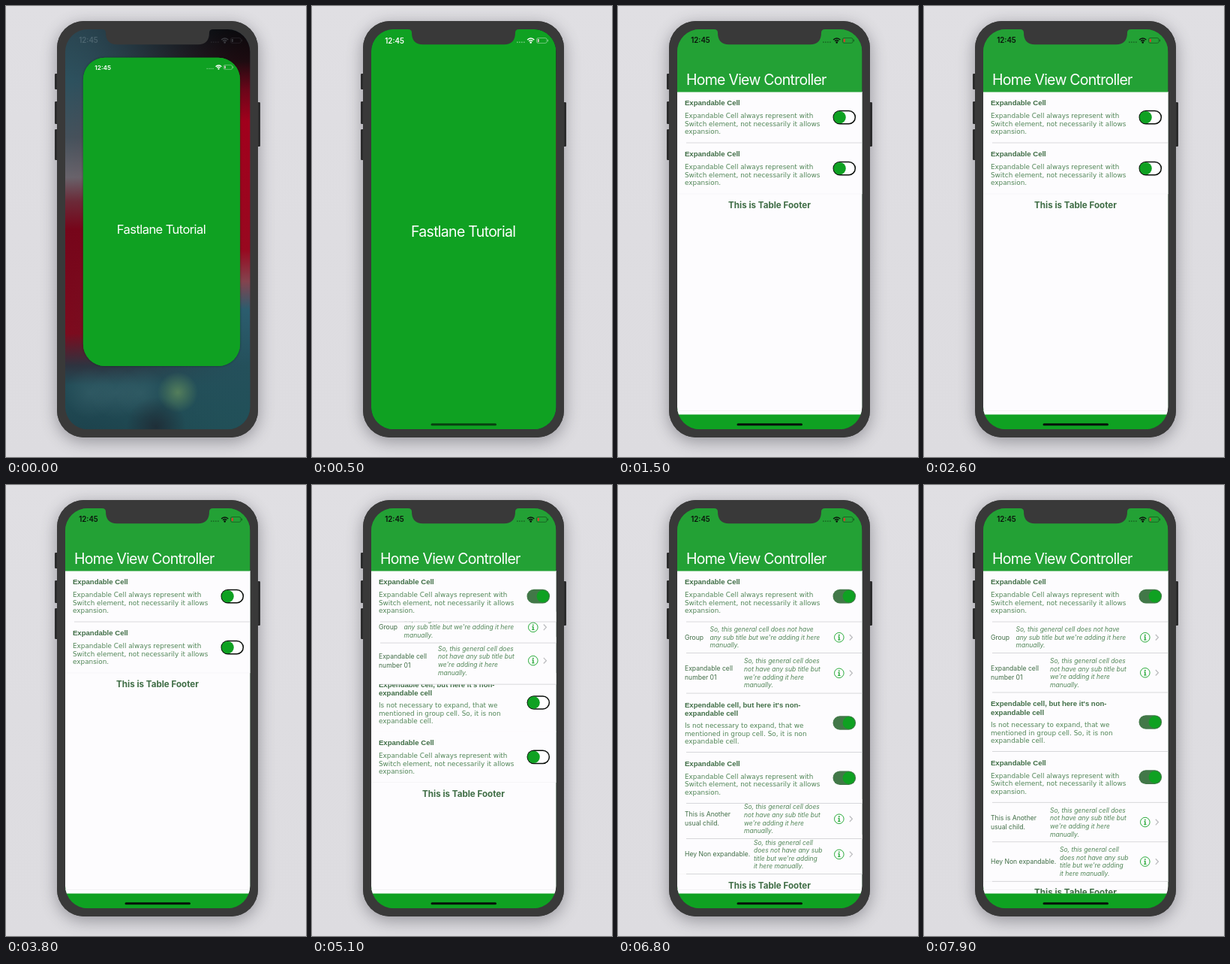
Write an HTML page with a canvas that moves like this. It is 400 by 600 pixels and loops after 8000 ms.

```html
<!DOCTYPE html>
<html lang="en">
<head>
<meta charset="utf-8">
<title>Expandable table</title>
<style>
html, body { margin: 0; width: 100%; height: 100%; overflow: hidden; background: #dedde1; }
canvas { display: block; width: 400px; height: 600px; }
</style>
</head>
<body>
<canvas id="stage"></canvas>
<script>
const LOOP = 8000;
const canvas = document.getElementById('stage');
const dpr = window.devicePixelRatio || 1;
canvas.width = 400 * dpr;
canvas.height = 600 * dpr;
const c = canvas.getContext('2d');

const SANS = 'Inter, Roboto, sans-serif';
const WIDE = '"DejaVu Sans", "Noto Sans", sans-serif';
const BOLD = '"Liberation Sans", Arial, sans-serif';
const GREEN = '#0fa122', HEADER = '#23a135', BODY = '#393939', PAPER = '#fdfcfe';
const INK = '#3f6d45', SOFT = '#518657', LINE = '#cfcfd2';
const SCREEN = { x: 79, y: 31, w: 246.4, h: 532.3, r: 30 };
const CORNER = 36;
const TABLE_TOP = 114, TABLE_END = 543.5, CELL_H = 67.8;

const clamp = v => Math.max(0, Math.min(1, v));
const lerp = (a, b, p) => a + (b - a) * p;
const phase = (t, start, length) => clamp((t - start) / length);
const smooth = p => p * p * (3 - 2 * p);
const easeOut = p => 1 - Math.pow(1 - p, 3);

function box(x, y, w, h, r, fill) {
  c.beginPath();
  c.roundRect(x, y, w, h, r);
  if (fill) { c.fillStyle = fill; c.fill(); }
}

function rect(x, y, w, h, fill) {
  c.fillStyle = fill;
  c.fillRect(x, y, w, h);
}

function disc(x, y, r, fill) {
  c.beginPath();
  c.arc(x, y, r, 0, Math.PI * 2);
  c.fillStyle = fill;
  c.fill();
}

// y is the middle of the capitals
function text(str, x, y, size, color, { style = '', font = SANS, align = 'left', track = 0 } = {}) {
  c.font = `${style} ${size}px ${font}`;
  c.letterSpacing = track + 'px';
  c.textAlign = align;
  c.textBaseline = 'alphabetic';
  c.fillStyle = color;
  c.fillText(str, x, y + size * 0.36);
  c.letterSpacing = '0px';
}

function lines(list, x, y, step, size, color, opts) {
  list.forEach((s, i) => text(s, x, y + i * step, size, color, opts));
}

function vertical(stops, y, h) {
  const g = c.createLinearGradient(0, y, 0, y + h);
  stops.forEach(([at, color]) => g.addColorStop(at, color));
  return g;
}

function glow(x, y, r, rgb, a) {
  const g = c.createRadialGradient(x, y, 0, x, y, r);
  g.addColorStop(0, `rgba(${rgb},${a})`);
  g.addColorStop(1, `rgba(${rgb},0)`);
  c.fillStyle = g;
  c.fillRect(x - r, y - r, r * 2, r * 2);
}

function statusBar(color, level) {
  text('12:45', 110, 46, 9.7, color, { style: '600', align: 'center' });
  c.fillStyle = color;
  c.globalAlpha *= 0.5;
  for (let i = 0; i < 4; i++) c.fillRect(273 + i * 3, 47.5, 1.7, 1.2);
  c.globalAlpha /= 0.5;
  c.strokeStyle = color;
  c.lineWidth = 1.5;
  [3.4, 6].forEach(r => {
    c.beginPath();
    c.arc(291.7, 49, r, -Math.PI * 0.77, -Math.PI * 0.23);
    c.stroke();
  });
  disc(291.7, 48.4, 1.3, color);
  c.lineWidth = 0.8;
  c.globalAlpha *= 0.5;
  box(299.5, 42.5, 13.6, 6.8, 2);
  c.stroke();
  c.fillRect(314, 44.6, 1, 2.6);
  c.globalAlpha /= 0.5;
  box(300.8, 43.7, 2, 4.4, 0.8, level);
}

function wallpaper() {
  const { x, y, w, h } = SCREEN;
  rect(x, y, w, h, vertical([
    [0, '#2a4551'], [0.13, '#2d515e'], [0.27, '#45515b'], [0.37, '#68636b'], [0.43, '#6b2a38'],
    [0.5, '#76051a'], [0.76, '#7c0b1e'], [0.84, '#2e333f'], [0.89, '#224c57'], [1, '#1d434d']], y, h));
  c.fillStyle = vertical([
    [0, '#09090c'], [0.08, '#1d0b10'], [0.15, '#6a0619'], [0.23, '#a1001c'], [0.55, '#98081f'],
    [0.63, '#84434e'], [0.7, '#2b5d6e'], [0.84, '#24505b'], [1, '#215058']], y, h);
  for (let i = 0; i < w; i++) {
    c.globalAlpha = smooth(i / w);
    c.fillRect(x + i, y, 1, h);
  }
  c.globalAlpha = 1;
  for (let i = 0; i < 3; i++) glow(112 + i * 34, 515, 34, '70,112,120', 0.36);
  glow(229, 514, 27, '100,142,92', 0.75);
  glow(200, 560, 40, '30,20,30', 0.5);
  c.globalAlpha = 0.25;
  statusBar('#b5c3ca', '#b5c3ca');
  c.globalAlpha = 1;
}

function splash(withStatus) {
  rect(SCREEN.x - 1, SCREEN.y - 1, SCREEN.w + 2, SCREEN.h + 2, GREEN);
  text('Fastlane Tutorial', 201.6, 300, 19.5, '#fff', { align: 'center', track: -0.7 });
  if (withStatus) statusBar('#fff', '#d8c8c8');
}

function opening(p) {
  wallpaper();
  const x = lerp(103, SCREEN.x, p), y = lerp(69, SCREEN.y, p);
  const w = lerp(209, SCREEN.w, p), h = lerp(409.5, SCREEN.h, p);
  const s = w / SCREEN.w;
  c.save();
  c.shadowColor = 'rgba(0,0,0,.4)';
  c.shadowBlur = 3 * dpr;
  box(x, y, w, h, 29, GREEN);
  c.restore();
  c.save();
  box(x, y, w, h, 29);
  c.clip();
  c.translate(x, y);
  c.scale(s, s);
  c.translate(-SCREEN.x, -SCREEN.y);
  splash(true);
  c.restore();
}

function toggle(y, p) {
  const k = smooth(p), m = k * k;
  const edge = `rgb(${lerp(8, 66, m)},${lerp(12, 120, m)},${lerp(8, 72, m)})`;
  const inset = lerp(1.5, 9.3, m);
  box(286.5, y - 9.3, 30.6, 18.6, 9.3, edge);
  if (k < 0.97) {
    const r = 9.3 - inset;
    box(286.5 + inset + 8 * k, y - r, 30.6 - inset * 2 - 8 * k, r * 2, r, '#fff');
  }
  disc(lerp(295.6, 307.8, k), y, 8.2, GREEN);
}

function rule(y, x = 91, color = LINE) {
  rect(x, y - 0.4, 326 - x, 0.8, color);
}

function switchCell(y, h, on, title, body) {
  rect(79, y, 247, h, PAPER);
  lines(title, 89, y + 15, 11.5, 9.55, INK, { style: 'bold', font: BOLD });
  lines(body, 89, y + 21 + title.length * 11, 10.6, 8.85, SOFT, { font: WIDE });
  toggle(y + h / 2 + 0.2, on);
}

function childRow(y, h, title, note, noteX) {
  rect(79, y, 247, h, PAPER);
  const mid = y + h / 2;
  lines(title, 89, mid - (title.length - 1) * 6, 12, 8.6, INK);
  lines(note, noteX, mid - (note.length - 1) * 5.3, 10.6, 8.5, SOFT, { style: 'italic' });
  c.strokeStyle = GREEN;
  c.lineWidth = 0.9;
  c.beginPath();
  c.arc(294.8, mid, 6.3, 0, Math.PI * 2);
  c.stroke();
  disc(294.8, mid - 3, 0.9, GREEN);
  rect(294.2, mid - 1.2, 1.3, 4.6, GREEN);
  rect(293.3, mid - 1.2, 1.6, 0.8, GREEN);
  rect(293.1, mid + 2.9, 3.5, 0.8, GREEN);
  c.strokeStyle = '#bdbdc0';
  c.lineWidth = 1.3;
  c.beginPath();
  c.moveTo(308.8, mid - 3.8);
  c.lineTo(312.4, mid);
  c.lineTo(308.8, mid + 3.8);
  c.stroke();
  rule(y + h);
}

const MAIN = ['Expandable Cell always represent with', 'Switch element, not necessarily it allows', 'expansion.'];
const FIXED = ['Is not necessary to expand, that we', 'mentioned in group cell. So, it is non', 'expandable cell.'];
const NOTE3 = ['So, this general cell does not have', "any sub title but we're adding it here", 'manually.'];
const NOTE4 = ['So, this general cell does', 'not have any sub title but', "we're adding it here", 'manually.'];
const NOTE5 = ['So, this general cell', 'does not have any sub', "title but we're adding", 'it here manually.'];

function table(t) {
  const p = smooth(phase(t, 4675, 600));
  const q = smooth(phase(t, 6320, 600));
  const first = phase(t, 4660, 270), second = phase(t, 5800, 270), third = phase(t, 6315, 270);

  const rowA = 182, hA = 41.5;
  const rowB = rowA + hA, hB = lerp(63, 52.5, q);
  const rowC = rowB + hB, hC = 78.5;
  const total = hA + hB + hC;
  const last = rowA + total * p;
  const childD = last + CELL_H, hD = 52.5;
  const end = childD + hD * 2 * q;
  const back = 1 - p, tuck = 1 - q;

  c.save();
  c.beginPath();
  c.rect(79, TABLE_TOP, 247, TABLE_END - TABLE_TOP);
  c.clip();
  rect(79, TABLE_TOP, 247, 430, PAPER);
  rect(79, 538, 247, 0.8, '#f1f0f2');
  rule(end, 79, '#ececee');
  text('This is Table Footer', 202, end + 15, 11.6, INK, { style: '700', align: 'center' });

  // lower rows first, so that each one slides out from under the row above
  const shown = phase(q, 0.05, 0.2);
  c.globalAlpha = shown;
  if (shown > 0) {
    childRow(childD + hD - hD * 2 * tuck, hD, ['Hey Non expandable.'], NOTE5, 181);
    childRow(childD - hD * tuck, hD, ['This is Another', 'usual child.'], NOTE4, 168);
  }
  c.globalAlpha = 1;
  switchCell(last, CELL_H, third, ['Expandable Cell'], MAIN);
  c.globalAlpha = shown;
  rule(childD);
  c.globalAlpha = 1;
  if (p > 0) {
    switchCell(rowC - 179 * back, hC, second, ["Expendable cell, but here it's non-", 'expandable cell'], FIXED);
    if (p === 1) rule(last);
    childRow(rowB - 105 * back, hB, ['Expandable cell', 'number 01'], NOTE4, 168);
    childRow(rowA - 66 * back, hA, ['Group'], NOTE3, 122.5);
  }
  switchCell(TABLE_TOP, CELL_H, first, ['Expandable Cell'], MAIN);
  rule(rowA);
  c.restore();
}

function home(t) {
  const { x, y, w, h } = SCREEN;
  rect(x, y, w, h, GREEN);
  table(t);
  rect(x, y, w, TABLE_TOP + 0.5 - y, HEADER);
  text('Home View Controller', 91, 98, 19.5, '#fff', { track: -0.74 });
  statusBar('#0b120c', '#e2342c');
}

function indicator(alpha) {
  c.globalAlpha = alpha;
  box(158.5, 555.2, 87.5, 3, 1.5, '#06120a');
  c.globalAlpha = 1;
}

function phone() {
  rect(0, 0, 400, 600, vertical([[0, '#e0dfe3'], [0.5, '#dedde1'], [1, '#dddce0']], 0, 600));
  c.save();
  c.shadowColor = 'rgba(40,40,50,.42)';
  c.shadowBlur = 22 * dpr;
  c.shadowOffsetY = 5 * dpr;
  box(68, 20, 268, 554, CORNER, BODY);
  c.restore();
  [[65, 90, 21], [65, 127, 30], [65, 164, 41], [334, 128, 59]].forEach(([x, y, h]) => box(x, y, 5, h, 1.2, '#2b2b2c'));
  box(68, 20, 268, 554, CORNER, BODY);
}

function notch() {
  c.fillStyle = BODY;
  c.beginPath();
  c.moveTo(128, 30);
  c.lineTo(276, 30);
  c.lineTo(276, 31);
  c.quadraticCurveTo(271, 31, 271, 35.5);
  c.quadraticCurveTo(271, 51.3, 256, 51.3);
  c.lineTo(148, 51.3);
  c.quadraticCurveTo(133, 51.3, 133, 35.5);
  c.quadraticCurveTo(133, 31, 128, 31);
  c.fill();
}

function draw(t) {
  c.setTransform(dpr, 0, 0, dpr, 0, 0);
  c.globalAlpha = 1;
  phone();
  c.save();
  box(SCREEN.x, SCREEN.y, SCREEN.w, SCREEN.h, SCREEN.r);
  c.clip();
  if (t < 600) {
    opening(easeOut(phase(t, 0, 580)));
  } else if (t < 1150) {
    splash(true);
  } else {
    home(t);
    const veil = 1 - phase(t, 1150, 270);
    if (veil > 0) {
      c.globalAlpha = veil;
      splash(false);
      c.globalAlpha = 1;
    }
  }
  indicator(phase(t, 300, 300));
  c.restore();
  notch();
}

const begin = performance.now();
function tick() {
  draw((performance.now() - begin) % LOOP);
  requestAnimationFrame(tick);
}
tick();
</script>
</body>
</html>
```
